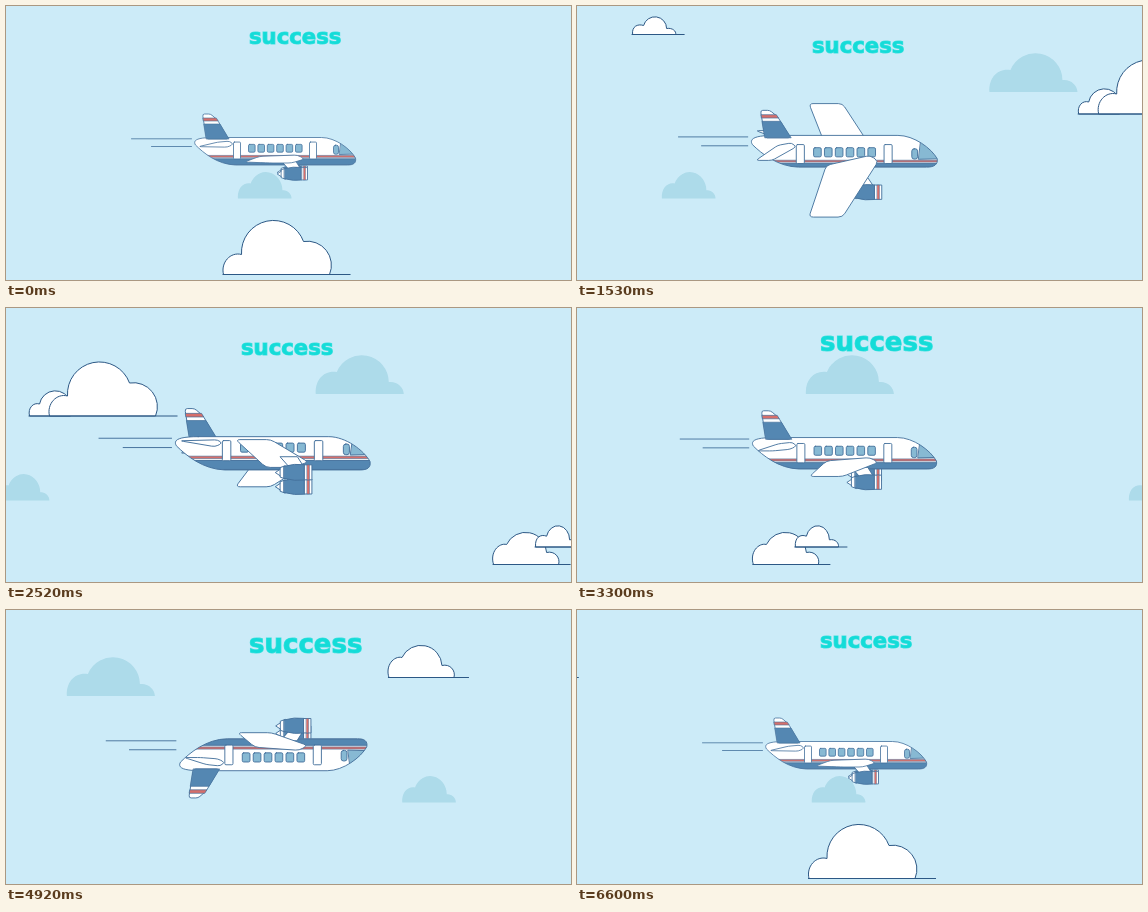
Write an HTML page that moves like this. It is 565 by 274 pixels and loops after 6.63 s.

```html
<!DOCTYPE html>
<html lang="en">
<head>
<meta charset="utf-8">
<title>Plane</title>
<style>
  html, body { margin: 0; width: 100%; height: 100%; overflow: hidden; background: #ccebf8; }
  svg { display: block; width: 565px; height: 274px; }
  text { font-family: "DejaVu Sans", Verdana, sans-serif; font-weight: bold; fill: #14dcd8;
         stroke: #45e1e0; stroke-width: 1.2; paint-order: stroke; }
  .line { fill: #fff; stroke: #2c5885; stroke-width: 1; vector-effect: non-scaling-stroke; stroke-linejoin: round; }
  .teal { fill: #addbea; }
  #plane { stroke: #45729d; stroke-width: .8; stroke-linejoin: round; stroke-linecap: round; }
</style>
</head>
<body>
<svg viewBox="0 0 565 274">
  <defs><clipPath id="hull"><path id="hullShape"/></clipPath></defs>
  <g id="sky"></g>
  <g id="plane"></g>
  <text id="word">success</text>
</svg>
<script>
const LOOP = 6630;
const WHITE = '#fff', BLUE = '#5487b2', RED = '#d66f6b', GLASS = '#87b9d3';
const byId = id => document.getElementById(id);

// ---- clouds ----
const outline = d => `<path class="line" d="${d}"/>`;
const BIG = outline('M1 0C-2 -12 8 -23 19 -20A32 32 0 0 1 81 -33A24 24 0 0 1 107 0Z');
const MID = outline('M1 0C-3 -12 6 -22 14 -20A21 21 0 0 1 54 -12C62 -14 68 -7 66 0Z');
const SMALL = outline('M1 0C0 -8 6 -11 12 -9A11.7 11.7 0 0 1 35 -6C41 -7 45 -3 44 0Z') + outline('M0 0H53');
const BACK = outline('M1 0C-1 -8 5 -14 11 -12A16 16 0 0 1 42 -14V0Z');
const TEAL = '<path class="teal" d="M0 0C-1 -14 8 -24 21 -22A27 27 0 0 1 73 -12C81 -13 88 -7 88 0Z"/>';
const at = (transform, body) => `<g transform="${transform}">${body}</g>`;

// Each cloud passes x at time t, moving left at v px/ms.
const clouds = [
  { t: 3300, x: 229, y: 86, v: .1037, art: TEAL },
  { t: 6479, x: 246.5, y: 192.5, v: .0961, art: at('scale(.61 .68)', TEAL) },
  { t: 0, x: 217, y: 268.5, v: .483, art: BIG + outline('M0 0H128') },
  { t: 1530, x: 55, y: 28.5, v: .4, art: SMALL },
  { t: 2520, x: 23, y: 108, v: .483, art: BACK + at('translate(20 0)', BIG) + outline('M0 0H149') },
  { t: 2520, x: 487, y: 256.5, v: .399,
    art: MID + outline('M0 0H78') + at('translate(42 -17.5) scale(1 1.2)', SMALL) },
  { t: 5460, x: 234, y: 67.5, v: .2745, art: MID + outline('M0 0H81') }
];
byId('sky').innerHTML = clouds.map(c => `<g>${c.art}</g>`).join('');
const cloudNodes = [...byId('sky').children];

// ---- motion ----
const ROLL = [[0, .9], [1200, 24], [1530, 17.9], [2520, -7], [3300, 4.3], [4440, 25.6],
              [5460, 349.5], [6600, 360.9], [LOOP, 360.9]];
const ZOOM = [[0, 1], [1530, 1.155], [2520, 1.21], [3300, 1.144], [4440, 1.193],
              [5460, 1.105], [6600, 1], [LOOP, 1]];
const WORDS = [[0, 243, 37.8, 21.2], [690, 235, 47.3, 21.2], [2640, 243, 43, 26], [6400, 243, 37.8, 21.2]];

// Smooth curve through keys that never overshoots them.
function follow(keys, t) {
  const rate = i => (keys[i + 1][1] - keys[i][1]) / (keys[i + 1][0] - keys[i][0]);
  const slope = i => {
    if (i === 0 || i === keys.length - 1) return 0;
    const a = rate(i - 1), b = rate(i);
    return a * b <= 0 ? 0 : 2 * a * b / (a + b);
  };
  let i = 0;
  while (i < keys.length - 2 && t >= keys[i + 1][0]) i++;
  const [t0, a] = keys[i], [t1, b] = keys[i + 1], h = t1 - t0, u = (t - t0) / h;
  const ease = u * u * (3 - 2 * u);
  return a + (b - a) * ease + h * u * (1 - u) * ((1 - u) * slope(i) - u * slope(i + 1));
}

// ---- plane ----
const R = 13.6;
const rad = deg => deg * Math.PI / 180;
const num = n => n.toFixed(2);
const path = (d, fill, extra = '') => `<path d="${d}" fill="${fill}" ${extra}/>`;
const box = (x, y, w, h, fill, extra = '') =>
  `<rect x="${num(x)}" y="${num(y)}" width="${w}" height="${num(h)}" fill="${fill}" ${extra}/>`;
const polygon = (pts, fill, extra) => path('M' + pts.map(p => p.map(num).join(' ')).join('L') + 'Z', fill, extra);

function softPolygon(pts, radius, fill) {
  const toward = (p, q) => {
    const len = Math.hypot(q[0] - p[0], q[1] - p[1]) || 1, k = Math.min(radius / len, .5);
    return [p[0] + (q[0] - p[0]) * k, p[1] + (q[1] - p[1]) * k].map(num).join(' ');
  };
  const n = pts.length;
  const d = pts.map((p, i) =>
    `${i ? 'L' : 'M'}${toward(p, pts[(i + n - 1) % n])}Q${p.map(num).join(' ')} ${toward(p, pts[(i + 1) % n])}`);
  return path(d.join('') + 'Z', fill);
}

function convexHull(pts) {
  const turn = (a, b, c) => (b[0] - a[0]) * (c[1] - a[1]) - (b[1] - a[1]) * (c[0] - a[0]);
  const chain = list => {
    const out = [];
    for (const p of list) {
      while (out.length > 1 && turn(out[out.length - 2], out[out.length - 1], p) <= 0) out.pop();
      out.push(p);
    }
    return out.slice(0, -1);
  };
  const sorted = [...pts].sort((a, b) => a[0] - b[0] || a[1] - b[1]);
  return [...chain(sorted), ...chain(sorted.reverse())];
}

function hullPath(cos) {
  const k = Math.abs(cos), flip = cos < 0 ? -1 : 1;
  const p = (x, y) => `${num(x)} ${num(y * flip)} `;
  return 'M' + p(-62, -13.5) + 'L' + p(46, -13.5) +
    'C' + p(60, -13.5) + p(75, -8 + 6 * k) + p(80, 7 * k) +
    'C' + p(78 + 3 * k, 7 + 5 * k) + p(62 + 16 * k, 14) + p(47 + 25 * k, 14) +
    'L' + p(-40, 14) +
    'C' + p(-58, 13.5) + p(-72, 9 - 7 * k) + p(-80, 3 - 9 * k) +
    'C' + p(-83, -2 - 9 * k) + p(-78, -13.5) + p(-62, -13.5) + 'Z';
}

function drawPlane(roll) {
  const cos = Math.cos(rad(roll)), sin = Math.sin(rad(roll));
  const yOf = (v, w) => v * cos + w * sin;      // v: down, w: towards the viewer
  const depth = (v, w) => w * cos - v * sin;
  const hull = hullPath(cos);
  byId('hullShape').setAttribute('d', hull);

  // Height on the round hull for angles spread about a middle one.
  const wrap = a => ((a + 180) % 360 + 360) % 360 - 180;
  const onHull = (mid, off) => R * Math.sin(rad(Math.max(-90, Math.min(90, wrap(mid + roll) + off))));
  function band(x, w, from, to, fill, extra) {
    const mid = (from + to) / 2, half = (to - from) / 2;
    const top = onHull(mid, -half), height = onHull(mid, half) - top;
    return height > .1 ? box(x, top, w, height, fill, extra) : '';
  }
  const bothSides = (x, w, from, to, fill, extra) =>
    band(x, w, from, to, fill, extra) + band(x, w, 180 - to, 180 - from, fill, extra);

  function body() {
    let s = path(hull, WHITE, 'stroke="none"') + '<g clip-path="url(#hull)">';
    s += band(-82, 166, 34, 146, BLUE) + bothSides(-82, 166, 18, 27, RED, 'stroke-width=".5"');
    for (let i = 0; i < 6; i++) s += bothSides(-27 + i * 9.4, 6.6, -30, 4, GLASS, 'rx="1.2"');
    s += bothSides(-42, 7, -42, 35, WHITE, 'rx="1"') + bothSides(34, 7, -42, 35, WHITE, 'rx="1"');
    s += bothSides(58, 5, -26, 13, GLASS, 'rx="2"');
    const shield = [[66, -52], [76, -52], [82, 20], [64, 22]];
    for (const side of [1, -1]) {
      const mid = side > 0 ? -8 : 188;
      if (Math.cos(rad(mid + roll)) > 0)
        s += polygon(shield.map(([x, off]) => [x, onHull(mid, off * side)]), GLASS);
    }
    return s + '</g>' + path(hull, 'none');
  }

  function fin() {
    const left = v => -73 + (v + 37) * .16, right = v => -58 + (v + 31) * .61;
    const stripe = (a, b, fill) => polygon(
      [[left(a), a * cos], [right(a), a * cos], [right(b), b * cos], [left(b), b * cos]], fill, 'stroke-width=".6"');
    return softPolygon([[-73, -37], [-65, -37], [-58, -31], [-47, -12], [-69, -12]].map(([x, v]) => [x, v * cos]), 2, WHITE) +
      stripe(-33, -30, RED) + stripe(-27, -12, BLUE);
  }

  // Silhouette of a thick wing from its corners.
  const surface = (pts, side, radius) =>
    softPolygon(convexHull(pts.map(([x, v, w]) => [x, yOf(v, w * side)])), radius, WHITE);
  const wing = side => surface([[-31, 8.5, 160], [-2, 8.5, 160], [-16, 5, 25], [22, 4, 0],
                                [29, 8, 4], [16, 12, 0], [-6, 12, 0]], side, 3.5);
  const tail = side => surface([[-77, -5, 42], [-63, -5, 42], [-58, -9, 12], [-46, -10, 8],
                                [-42, -7, 10], [-48, -4, 10]], side, 2.5);

  function engine(side) {
    const y = yOf(22, 48 * side), root = yOf(9, 48 * side);
    const up = cos < 0 ? 5 : -5;
    return polygon([[6, root], [20, root], [25, y + up], [13, y + up]], WHITE) +
      at(`translate(0 ${num(y)})`,
        path('M2 0L8 -4V4Z', WHITE) + path('M6 -4L10 -5.5V5.5L6 4Z', WHITE) +
        path('M9 -5Q18 -7.5 26 -6.3V6.3Q18 7.5 9 5Z', BLUE) +
        box(26, -6.2, 6, 12.4, WHITE) + box(28, -6.2, 2, 12.4, RED, 'stroke-width=".4"'));
  }

  const parts = [[0, body()], [depth(-25, 0), fin()]];
  for (const side of [1, -1]) parts.push(
    [depth(9, 48 * side), wing(side)],
    [depth(22, 48 * side), engine(side)],
    [depth(-7, 15 * side), tail(side)]);
  parts.sort((a, b) => a[0] - b[0]);
  return path('M-144 -12.2H-84M-124 -4.5H-84', 'none') + parts.map(p => p[1]).join('');
}

function render(t) {
  clouds.forEach((c, i) => {
    const dt = ((t - c.t + LOOP * 1.5) % LOOP) - LOOP / 2;
    cloudNodes[i].setAttribute('transform', `translate(${num(c.x - c.v * dt)} ${c.y})`);
  });

  const zoom = follow(ZOOM, t), plane = byId('plane');
  plane.setAttribute('transform', `translate(${num(269.5 - (zoom - 1) * 11)} 145) scale(${zoom.toFixed(4)})`);
  plane.innerHTML = drawPlane(follow(ROLL, t));

  const [, x, y, size] = WORDS.filter(w => w[0] <= t).pop();
  const word = byId('word');
  word.setAttribute('x', x);
  word.setAttribute('y', y);
  word.setAttribute('font-size', size);
}

const start = performance.now();
function tick() {
  render((performance.now() - start) % LOOP);
  requestAnimationFrame(tick);
}
tick();
</script>
</body>
</html>
```
